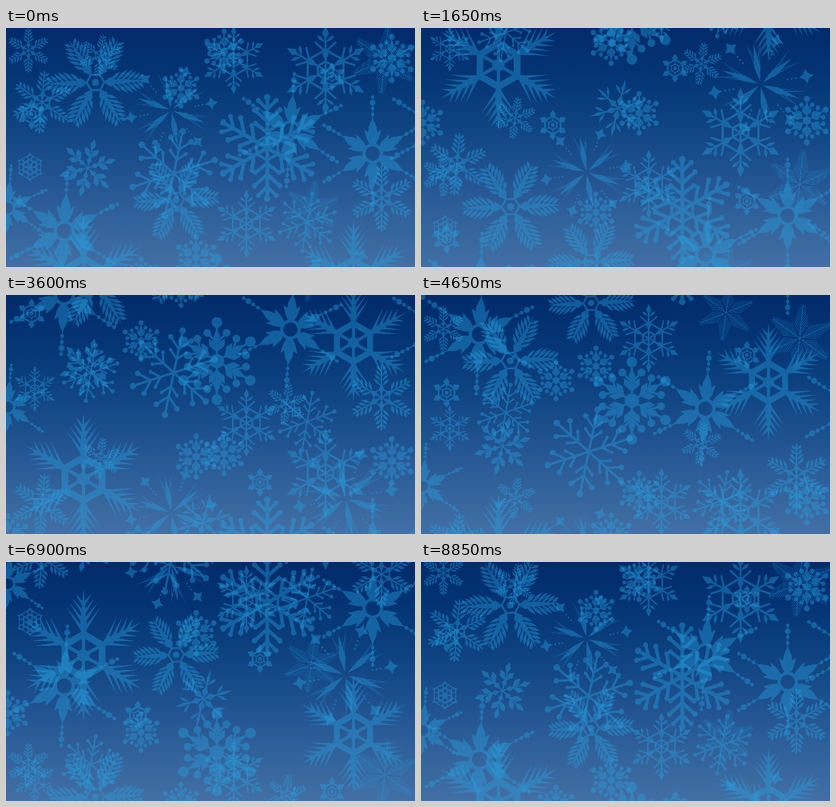
Animation of 512x299 px, one loop 9 s. Source, as an HTML page with a canvas:

```html
<!DOCTYPE html>
<html lang="en">
<head>
<meta charset="utf-8">
<title>Snowfall</title>
<style>
html, body { margin: 0; width: 100%; height: 100%; overflow: hidden; background: #0b3a7c; }
canvas { display: block; width: 100%; height: 100%; }
</style>
</head>
<body>
<canvas id="stage" width="512" height="299"></canvas>
<script>
const W = 512, H = 299, LOOP = 9000, STEP = 150, TILE = 424;
const COLOR = '#2aa3e2', RAD = Math.PI / 180;
const ctx = document.getElementById('stage').getContext('2d');
let g; // context of the sprite being drawn; 100 units = flake radius, arms point up

function line(x1, y1, x2, y2, w) {
  g.lineWidth = w;
  g.beginPath();
  g.moveTo(x1, y1);
  g.lineTo(x2, y2);
  g.stroke();
}
function dot(x, y, r) {
  g.beginPath();
  g.arc(x, y, r, 0, 7);
  g.fill();
}
function ring(y, r, w) {
  g.lineWidth = w;
  g.beginPath();
  g.arc(0, y, r, 0, 7);
  g.stroke();
}
function poly(...p) {
  g.beginPath();
  for (let i = 0; i < p.length; i += 2) g.lineTo(p[i], p[i + 1]);
  g.closePath();
  g.fill();
}
const kite = (inner, mid, outer, w) => poly(0, -inner, w, -mid, 0, -outer, -w, -mid);

// mirrored side twigs starting on the spine
function twigs(y, len, angle, w, ball = 0) {
  const dx = Math.sin(angle * RAD) * len, dy = Math.cos(angle * RAD) * len;
  for (const s of [-1, 1]) {
    line(0, -y, s * dx, -y - dy, w);
    if (ball) dot(s * dx, -y - dy, ball);
  }
}
// mirrored tapering needles
function needles(y, len, angle, w) {
  const sx = Math.sin(angle * RAD), cy = Math.cos(angle * RAD);
  for (const s of [-1, 1]) {
    poly(0, -y + w, s * sx * len, -y - cy * len, 0, -y - w);
  }
}
// mirrored leaves, widest in the middle
function leaves(y, len, angle, w) {
  for (const s of [-1, 1]) {
    g.save();
    g.translate(0, -y);
    g.rotate(s * angle * RAD);
    kite(0, len * 0.6, len, w);
    g.restore();
  }
}
// bar from this arm to the next one
function bar(r, w) {
  line(0, -r, r * Math.sin(60 * RAD), -r / 2, w);
}
function sparkle(y, r) {
  const q = r * 0.34;
  poly(0, -y - r, q, -y - q, r, -y, q, -y + q, 0, -y + r, -q, -y + q, -r, -y, -q, -y - q);
}

const arms = {
  spiky() {
    kite(20, 42, 100, 5.5);
    line(0, -6, 0, -36, 5);
    bar(32, 10);
    dot(0, 0, 9);
    for (let i = 0; i < 4; i++) needles(36 + i * 13, 45 - i * 8, 35, 5);
  },
  star() {
    kite(5, 34, 78, 6);
    needles(18, 70, 13, 5);
    needles(40, 52, 20, 3);
    g.save();
    g.rotate(30 * RAD);
    sparkle(88, 14);
    for (let i = 0; i < 3; i++) dot(0, -52 - i * 8, 1.8);
    g.restore();
  },
  fern() {
    kite(14, 50, 100, 5.5);
    for (let i = 0; i < 6; i++) leaves(28 + i * 11, 38 - Math.abs(i - 1.5) * 5, 42, 3.6);
    kite(16, 30, 48, 10);
    bar(18, 4);
    dot(0, 0, 7);
  },
  branch() {
    line(0, 0, 0, -92, 5);
    twigs(30, 24, 45, 5, 4);
    twigs(52, 32, 45, 5, 6);
    dot(0, -93, 7);
  },
  balls() {
    dot(0, 0, 16);
    line(0, -10, 0, -88, 5);
    dot(0, -88, 12);
    twigs(42, 31, 45, 5, 9);
    leaves(20, 36, 30, 8);
    kite(40, 56, 74, 8);
  },
  lattice() {
    line(0, 0, 0, -92, 4.5);
    bar(46, 5);
    bar(20, 5);
    twigs(42, 32, 48, 4.5);
    leaves(62, 26, 50, 4);
    kite(70, 82, 100, 8);
    kite(20, 36, 52, 7);
  },
  thick() {
    line(0, 0, 0, -92, 7);
    twigs(28, 27, 52, 6.5, 4.5);
    twigs(48, 31, 48, 6.5, 5);
    twigs(70, 23, 45, 6, 4.5);
    dot(0, -92, 6);
    bar(22, 5);
  },
  beaded() {
    poly(-4, -14, -10, -24, -15, -42, -8, -37, -7, -46, 0, -62, 7, -46, 8, -37, 15, -42, 10, -24, 4, -14);
    ring(0, 15, 5);
    line(0, -55, 0, -100, 1.6);
    [68, 78, 88, 98].forEach((y, i) => dot(0, -y, i === 2 ? 5 : 3.2));
  },
  needle() {
    line(0, 0, 0, -100, 2.2);
    for (let i = 0; i < 10; i++) twigs(10 + i * 9, 42 - i * 3.2, 32, 1.6);
  },
  leaf() {
    line(0, 0, 0, -96, 4.5);
    for (let i = 0; i < 4; i++) leaves(32 + i * 15, 33 - i * 4, 45, 4.5);
    kite(6, 24, 42, 8);
    bar(26, 4);
  },
  bloom() {
    line(0, 0, 0, -70, 4);
    leaves(34, 42, 34, 10);
    kite(58, 80, 100, 10);
    kite(12, 26, 42, 9);
  },
  hexstar() {
    kite(46, 70, 100, 22);
    line(0, -60, 52, -30, 12);
    bar(30, 8);
    line(0, -28, 0, -50, 6);
    dot(0, 0, 12);
  },
  lace() {
    ring(-34, 17, 8);
    ring(-72, 17, 8);
    bar(58, 8);
    bar(92, 7);
    dot(0, -94, 9);
    dot(0, 0, 12);
  },
  aster() {
    line(0, 0, 0, -60, 5);
    kite(40, 70, 100, 6);
    leaves(46, 42, 42, 5);
    kite(6, 24, 46, 11);
  }
};

// kind, x, y at time zero, radius, tiles fallen per loop, rotation
const flakes = [
  ['spiky', 435, 314, 75, 1, 0],
  ['spiky', 97, 315, 84, 2, 0],
  ['star', 207, 103, 58, 1, -10],
  ['star', 425, 339, 66, 2, -10],
  ['fern', 112, 68, 62, 2, 28],
  ['fern', 213, 215, 55, 1, 27],
  ['branch', 210, 182, 58, 2, 12],
  ['balls', 264, 337, 55, 1, 0],
  ['thick', 327, 150, 69, 1, 0],
  ['beaded', 459, 157, 72, 1, 0],
  ['beaded', 356, 128, 72, 2, 4],
  ['beaded', 73, 254, 76, 1, 3],
  ['beaded', 548, 128, 75, 2, 2],
  ['beaded', 2, 225, 54, 2, 5],
  ['lattice', 400, 53, 56, 1, 0],
  ['lattice', 285, 40, 43, 2, 0],
  ['lattice', 301, 245, 43, 2, 0],
  ['branch', 377, 243, 39, 2, 10],
  ['needle', 474, 40, 42, 2, 6],
  ['needle', 382, 227, 35, 1, 8],
  ['leaf', 470, 213, 43, 2, 0],
  ['leaf', 28, 28, 29, 2, 0],
  ['leaf', 45, 93, 41, 1, 5],
  ['branch', 106, 352, 38, 1, 10],
  ['bloom', 102, 175, 37, 2, 14],
  ['balls', 219, 75, 26, 2, 0],
  ['balls', 238, 287, 29, 2, 0],
  ['balls', 169, 312, 26, 1, 0],
  ['hexstar', 165, 390, 19, 2, 0],
  ['hexstar', 32, 108, 19, 2, 0],
  ['lattice', 36, 372, 29, 1, 0],
  ['lace', 30, 174, 17, 1, 0],
  ['balls', 2, 387, 29, 2, 0],
  ['balls', 483, 38, 31, 1, 0],
  ['hexstar', 318, 319, 18, 2, 0],
  ['leaf', 351, 391, 28, 1, 8],
  ['hexstar', 408, 61, 18, 2, 0],
  ['balls', 273, 29, 28, 1, 0],
  ['aster', 247, 369, 37, 2, 14],
  ['leaf', 118, 35, 28, 1, 8]
].map(([kind, x, y, r, falls, turn]) =>
  ({ x, y, falls, half: r * 1.1 + 3, sprite: makeSprite(kind, r, turn) }));

function makeSprite(kind, r, turn) {
  const half = r * 1.1 + 3, c = document.createElement('canvas');
  c.width = c.height = Math.ceil(half * 4);
  g = c.getContext('2d');
  g.fillStyle = g.strokeStyle = COLOR;
  g.scale(2, 2);
  g.translate(half, half);
  g.scale(r / 100, r / 100);
  g.rotate(turn * RAD);
  for (let i = 0; i < 6; i++) {
    arms[kind]();
    g.rotate(60 * RAD);
  }
  return c;
}

const sky = ctx.createLinearGradient(0, 0, 0, H);
[[0, '#022b6b'], [0.2, '#053575'], [0.4, '#0f4381'], [0.6, '#205290'], [0.8, '#32629b'], [1, '#4270a5']]
  .forEach(([at, color]) => sky.addColorStop(at, color));

function draw(time) {
  const phase = Math.floor((time % LOOP) / STEP) * STEP / LOOP;
  ctx.globalAlpha = 1;
  ctx.fillStyle = sky;
  ctx.fillRect(0, 0, W, H);
  ctx.globalAlpha = 0.4;
  for (const f of flakes) {
    const y = (f.y + phase * f.falls * TILE) % TILE;
    const size = f.sprite.width / 2;
    for (const top of [y, y - TILE]) {
      if (top - f.half < H && top + f.half > 0) {
        ctx.drawImage(f.sprite, f.x - f.half, top - f.half, size, size);
      }
    }
  }
}

const start = performance.now();
function tick() {
  draw(performance.now() - start);
  requestAnimationFrame(tick);
}
tick();
</script>
</body>
</html>
```
